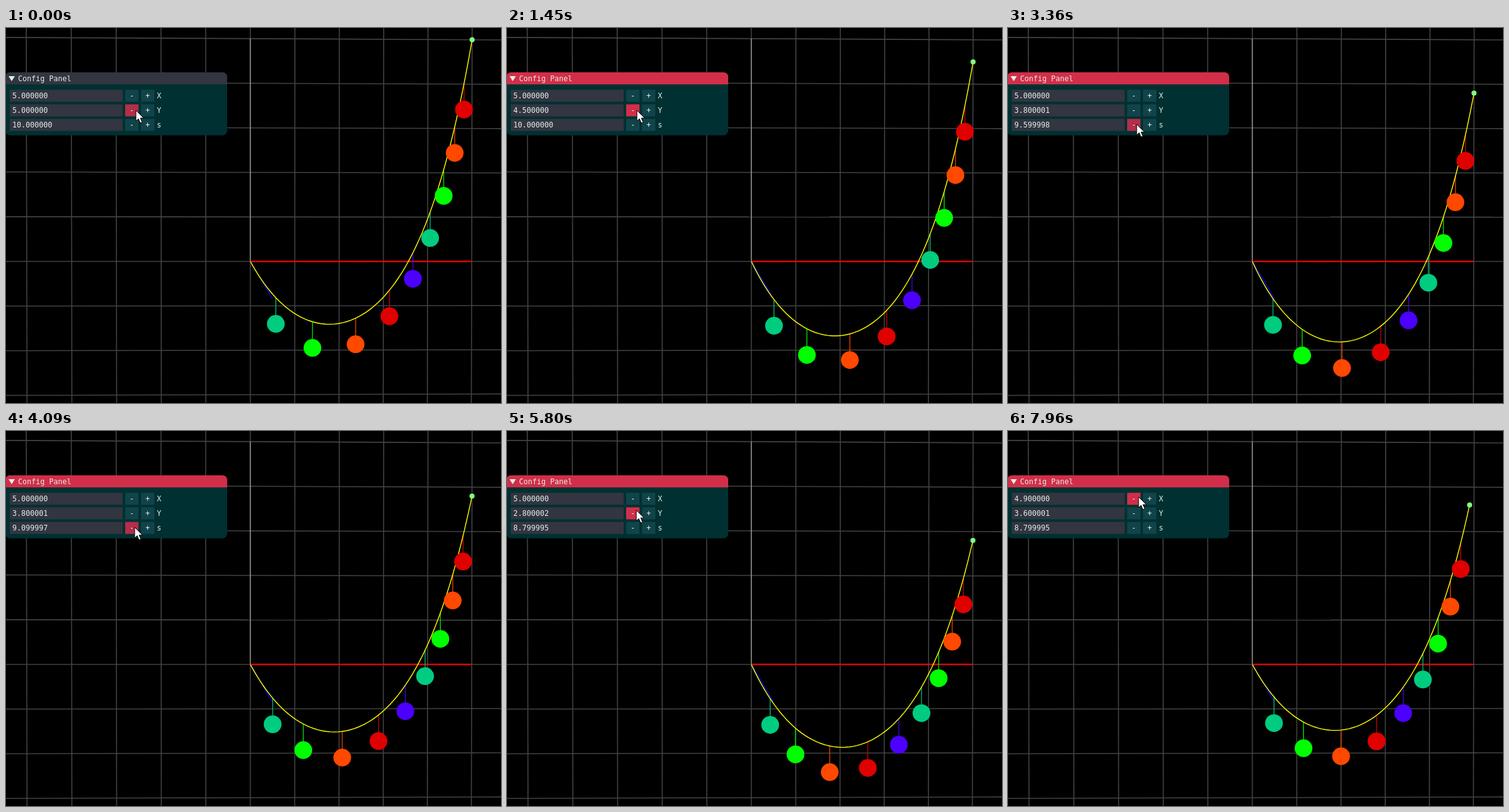
Animation, 781 px wide and 592 px high, one loop 8 s. Source, as an HTML page:

```html
<!DOCTYPE html>
<html lang="en">
<head>
<meta charset="utf-8">
<title>Hanging chain</title>
<style>
  html, body { margin: 0; width: 100%; height: 100%; overflow: hidden; background: #000; }
  svg { display: block; }
  text { font: 11.63px "DejaVu Sans Mono", "Liberation Mono", monospace; fill: #dfeee6; white-space: pre; }
  .grid { stroke: #424242; stroke-width: 1.6; fill: none; }
  .field { fill: #333541; }
  .button { fill: #11444a; }
  .button.hover { fill: #b32e49; }
  .button.active { fill: #d22e49; }
  #title { fill: #333541; }
  #title.focus { fill: #d22e49; }
</style>
</head>
<body>
<svg id="stage" width="781" height="592" viewBox="0 0 781 592">
  <g id="scene"></g>
  <g id="panel">
    <rect x="-1" y="70" width="350" height="99.5" rx="8" fill="#003031"/>
    <path id="title" d="M-1 89V78Q-1 70 7 70H341Q349 70 349 78V89Z"/>
    <path d="M4 76H14L9 84Z" fill="#dfeee6"/>
    <text x="19" y="84">Config Panel</text>
  </g>
  <path id="cursor" d="M0 0V17L4 13.3L6.8 20L9.8 18.7L7 12.2H12.3Z" fill="#fff" stroke="#000" stroke-width="1"/>
</svg>
<script>
const LOOP = 8000, BEADS = 9, HANG = 0.59;
const COLORS = ['#00cc80', '#00ff00', '#ff4800', '#e00000', '#4c00ff'];

// Step tracks: [time, value...]
const yClicks = [[0, 0], [870, 1], [980, 2], [1100, 3], [1330, 4], [1450, 5], [1560, 6], [1800, 7],
  [1910, 8], [2030, 9], [2270, 10], [2390, 11], [2510, 12], [5550, 15], [5670, 18], [5790, 22],
  [5910, 26], [6040, 29], [6740, 30], [6860, 34], [6980, 39], [7100, 44]];
const sClicks = [[0, 0], [2870, 1], [3120, 2], [3240, 3], [3360, 4], [3610, 5], [3730, 6], [3850, 7],
  [3970, 8], [4090, 9], [4330, 10], [4450, 11], [4580, 12]];
const xClicks = [[0, 0], [7960, 1]];
const pointer = [[0, 205, 130], [2510, 203, 140], [2630, 203, 147], [2750, 203, 152], [4820, 203, 146],
  [4940, 203, 137], [5060, 204, 129], [5180, 204, 125], [6040, 216, 123], [6160, 231, 123],
  [7350, 217, 112], [7470, 206, 104]];
// Mouse down and up times, alternating
const mouse = [750, 870, 980, 1100, 1210, 1330, 1450, 1560, 1680, 1800, 1910, 2030, 2150, 2270, 2390, 2510,
  2750, 2870, 3240, 3360, 3490, 3610, 3730, 3850, 3970, 4090, 4450, 4580, 5300, 6040, 6500, 7100, 7710];
const Y_DOWN = 29;

const $ = id => document.getElementById(id);
const scene = $('scene'), panel = $('panel');

function add(parent, tag, attrs, text) {
  const el = document.createElementNS('http://www.w3.org/2000/svg', tag);
  set(el, attrs);
  if (text) el.textContent = text;
  parent.appendChild(el);
  return el;
}

function set(el, attrs) {
  for (const key in attrs) el.setAttribute(key, attrs[key]);
}

const at = (track, t) => track.findLast(step => step[0] <= t);

// World units to pixels, with the slight tilt of the camera
function project(x, y) {
  const k = 70.2 / (1 + 0.001 * x - 0.0004 * y);
  return [385.5 + x * k, 368.5 - y * k];
}

function line(a, b, attrs) {
  const [x1, y1] = project(...a), [x2, y2] = project(...b);
  return add(scene, 'line', { x1, y1, x2, y2, ...attrs });
}

for (let i = -6; i <= 6; i++) {
  line([i, -4], [i, 6], { class: 'grid' });
  line([-6, i], [6, i], { class: 'grid' });
}
line([0, 0], [0, 5], { stroke: '#a0a0a0', 'stroke-width': 1.3 });
line([0, 0], [5, 0], { stroke: '#f00', 'stroke-width': 2 });
add(scene, 'path', { d: 'M385.5 368.5L420 427', stroke: '#00f', 'stroke-width': 1.4 });

const strings = [], balls = [];
for (let i = 0; i < BEADS; i++)
  strings.push(add(scene, 'line', { stroke: COLORS[i % 5], 'stroke-width': 1.4, opacity: 0.85 }));
const chain = add(scene, 'path', { fill: 'none', stroke: '#ff0', 'stroke-width': 1.4 });
for (let i = 0; i < BEADS; i++)
  balls.push(add(scene, 'circle', { r: 14, fill: COLORS[i % 5] }));
const tip = add(scene, 'circle', { r: 4, fill: '#80ff80' });

const rows = ['X', 'Y', 's'].map((name, i) => {
  const y = 97.5 + 23 * i, base = y + 13.5;
  add(panel, 'rect', { class: 'field', x: 6, y, width: 178, height: 19 });
  const value = add(panel, 'text', { x: 10, y: base });
  const buttons = ['-', '+'].map((sign, j) => {
    const x = 188 + 25 * j;
    const box = add(panel, 'rect', { class: 'button', x, y, width: 21, height: 19 });
    add(panel, 'text', { x: x + 7, y: base }, sign);
    return { x, y, box };
  });
  add(panel, 'text', { x: 238, y: base }, name);
  return { value, buttons };
});

// Repeated single precision steps of 0.1
function step(value, count, sign) {
  const d = Math.fround(0.1) * sign;
  for (let i = 0; i < count; i++) value = Math.fround(value + d);
  return value;
}

// Catenary from the origin to (w, h) with the given length, as a function of arc length
function catenary(w, h, length) {
  const ratio = Math.sqrt(length * length - h * h) / w;
  let lo = 0.01, hi = 10;
  for (let i = 0; i < 45; i++) {
    const u = (lo + hi) / 2;
    if (Math.sinh(u) / u < ratio) lo = u; else hi = u;
  }
  const a = w / (2 * lo);
  const low = w / 2 - a * Math.atanh(h / length);
  const s0 = a * Math.sinh(low / a);
  return s => [low + a * Math.asinh((s - s0) / a), Math.hypot(a, s - s0) - Math.hypot(a, s0)];
}

function drawChain(x, y, s) {
  const curve = catenary(x, y, s);
  const points = Array.from({ length: 101 }, (_, i) => project(...curve(s * i / 100)));
  chain.setAttribute('d', 'M' + points.map(p => p.map(v => v.toFixed(2)).join(' ')).join('L'));
  for (let i = 0; i < BEADS; i++) {
    const [px, py] = curve(s * (i + 1) / (BEADS + 1));
    const [x1, y1] = project(px, py), [x2, y2] = project(px, py - HANG);
    set(strings[i], { x1, y1, x2, y2 });
    set(balls[i], { cx: x2, cy: y2 });
  }
  const [cx, cy] = project(x, y);
  set(tip, { cx, cy });
}

function drawPanel(t, values) {
  const [, mx, my] = at(pointer, t);
  const down = mouse.filter(m => m <= t).length % 2 === 1;
  rows.forEach(({ value, buttons }, i) => {
    value.textContent = values[i].toFixed(6);
    for (const { x, y, box } of buttons) {
      const over = mx >= x && mx < x + 21 && my >= y && my < y + 23;
      box.setAttribute('class', 'button' + (over ? down ? ' active' : ' hover' : ''));
    }
  });
  $('title').setAttribute('class', t >= mouse[0] ? 'focus' : '');
  $('cursor').setAttribute('transform', `translate(${mx} ${my})`);
}

function frame() {
  const t = performance.now() % LOOP;
  const n = at(yClicks, t)[1];
  const x = step(5, at(xClicks, t)[1], -1);
  const y = step(step(5, Math.min(n, Y_DOWN), -1), Math.max(0, n - Y_DOWN), 1);
  const s = step(10, at(sClicks, t)[1], -1);
  drawChain(x, y, s);
  drawPanel(t, [x, y, s]);
  requestAnimationFrame(frame);
}
frame();
</script>
</body>
</html>
```
